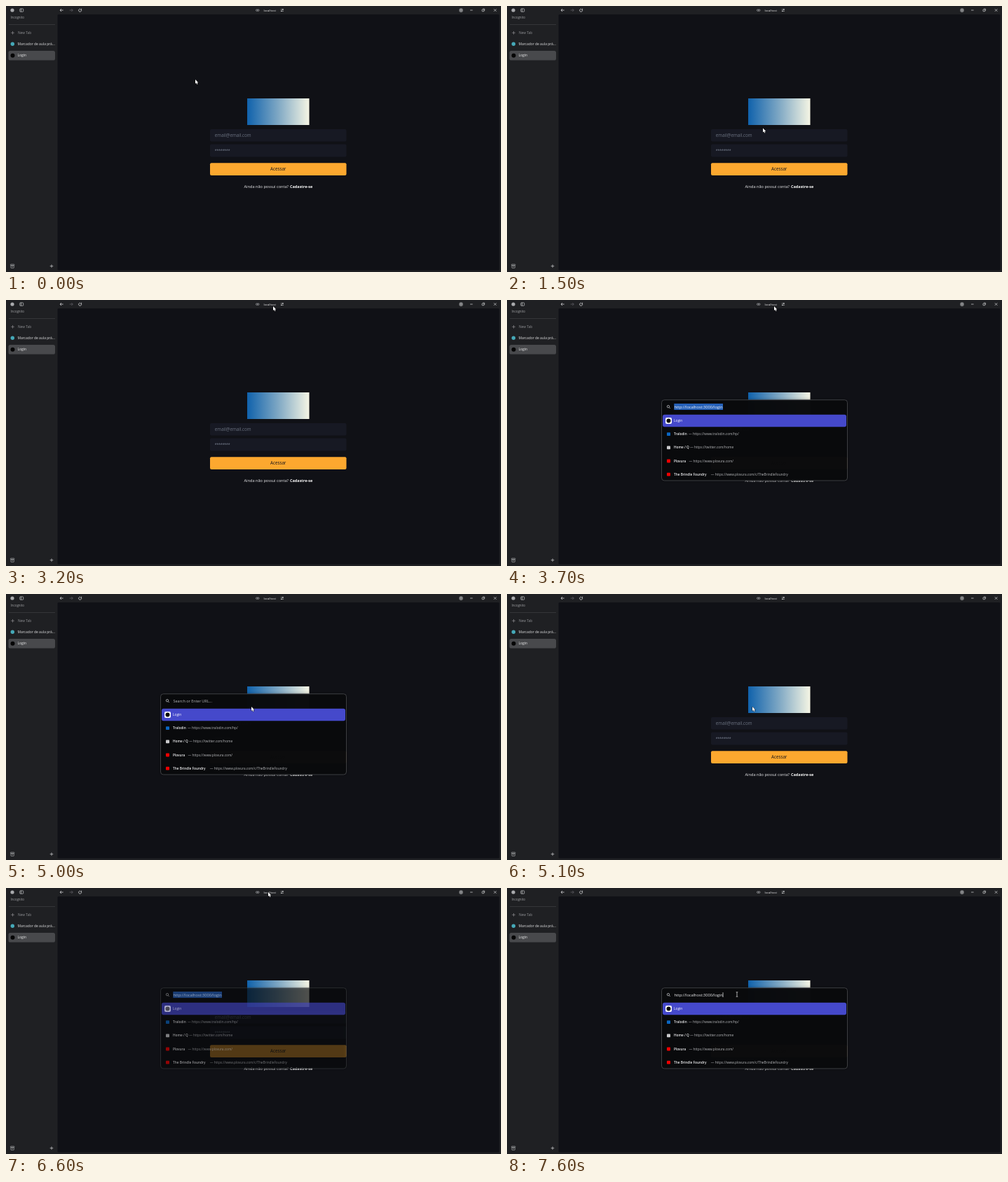
These frames come from a looping animation (706 by 380 pixels, 8000 ms). An HTML page with a canvas:

```html
<!DOCTYPE html>
<html lang="pt">
<head>
<meta charset="utf-8">
<title>Login</title>
<style>
  html, body { margin: 0; width: 100%; height: 100%; overflow: hidden; background: #1f2023; }
  canvas { display: block; width: 706px; height: 380px; }
</style>
</head>
<body>
<canvas id="stage"></canvas>
<script>
const W = 706, H = 380, LOOP = 8000, TICK = 100;
const canvas = document.getElementById('stage');
const dpr = window.devicePixelRatio || 1;
canvas.width = W * dpr;
canvas.height = H * dpr;
const ctx = canvas.getContext('2d');
const SANS = '"Open Sans", "Noto Sans", sans-serif';

// time, x, y of the pointer tip
const PATH = [
  [600, 270, 105], [900, 360, 170],
  [1200, 360, 170], [1500, 365, 174.5], [1900, 369, 185],
  [2200, 369, 185], [2300, 389.5, 115], [2600, 388, 28], [2800, 385, 12],
  [2900, 385, 12], [3200, 381, 9],
  [3900, 381, 9], [4300, 354, 115], [4600, 350, 161],
  [5200, 350, 161], [5400, 347, 90], [5700, 368, 0],
  [5900, 368, 0], [6100, 374, 6],
  [6700, 374, 6], [7000, 338, 118], [7200, 328, 152]
];

const clamp = v => Math.max(0, Math.min(1, v));
const smooth = v => { v = clamp(v); return v * v * (3 - 2 * v); };
const mix = (a, b, k) => a + (b - a) * k;
const mixRgb = (a, b, k) => `rgb(${a.map((v, i) => Math.round(mix(v, b[i], k)))})`;

function pointerAt(t) {
  if (t <= PATH[0][0]) return PATH[0].slice(1);
  for (let i = 1; i < PATH.length; i++) {
    const [t0, x0, y0] = PATH[i - 1], [t1, x1, y1] = PATH[i];
    if (t <= t1) {
      const k = (t - t0) / (t1 - t0);
      return [mix(x0, x1, k), mix(y0, y1, k)];
    }
  }
  return PATH[PATH.length - 1].slice(1);
}

function box(x, y, w, h, r, fill, stroke, width = 0.6) {
  ctx.beginPath();
  ctx.roundRect(x, y, w, h, r);
  if (fill) { ctx.fillStyle = fill; ctx.fill(); }
  if (stroke) { ctx.strokeStyle = stroke; ctx.lineWidth = width; ctx.stroke(); }
}

function dot(x, y, r, fill) {
  ctx.beginPath();
  ctx.arc(x, y, r, 0, Math.PI * 2);
  ctx.fillStyle = fill;
  ctx.fill();
}

// each line is a flat list of x, y pairs
function lines(color, width, ...list) {
  ctx.strokeStyle = color;
  ctx.lineWidth = width;
  ctx.beginPath();
  for (const p of list) {
    ctx.moveTo(p[0], p[1]);
    for (let i = 2; i < p.length; i += 2) ctx.lineTo(p[i], p[i + 1]);
  }
  ctx.stroke();
}

// y is the middle of the line
function text(str, x, y, size, color, weight = 400, align = 'left', family = SANS) {
  ctx.font = `${weight} ${size}px ${family}`;
  ctx.textAlign = align;
  ctx.fillStyle = color;
  ctx.fillText(str, x, y + size * 0.33);
}

function plus(x, y, color) {
  lines(color, 0.7, [x - 2.3, y, x + 2.3, y], [x, y - 2.3, x, y + 2.3]);
}

function arrow(x, y, dir, color) {
  lines(color, 0.8, [x - 2.3, y, x + 2.3, y],
    [x + dir * 0.3, y - 2, x + dir * 2.3, y, x + dir * 0.3, y + 2]);
}

function drawSidebar() {
  const grey = '#b9babd';
  dot(9, 6, 2.6, '#a9aaad');
  box(19.7, 3.9, 5, 4.3, 0.8, null, '#c8c9cb', 0.7);
  lines('#c8c9cb', 0.7, [21.5, 4, 21.5, 8]);
  text('Incognito', 6.5, 17, 4.5, '#a2a3a6');
  lines('#3a3b3f', 0.8, [4, 26.5, 70, 26.5]);
  plus(9.5, 38.3, '#8e8f93');
  text('New Tab', 17, 38.4, 4.8, '#919296');
  dot(9.3, 54.3, 2.7, '#45a9b8');
  text('Marcador de aula prá...', 16.5, 54.6, 4.95, '#e2e2e4', 500);
  box(3.5, 64, 66.5, 13.5, 2.6, '#48494c');
  dot(9.5, 70.8, 3, '#050505');
  text('Login', 16.5, 70.8, 4.95, '#f2f2f3', 500);
  box(6.4, 369, 5.4, 1.7, 0.4, null, grey);
  box(6.9, 370.7, 4.4, 3.6, 0.5, null, grey);
  lines(grey, 0.6, [8.2, 372.2, 10, 372.2]);
  plus(65, 371.6, '#d0d1d3');
}

function drawTopBar() {
  const light = '#d3d4d6', grey = '#a4a5a8';
  arrow(79.3, 6, -1, light);
  arrow(93, 6, 1, '#5d5e62');
  ctx.beginPath();
  ctx.arc(105.6, 6.2, 2, -0.6, 4.9);
  ctx.strokeStyle = light;
  ctx.lineWidth = 0.8;
  ctx.stroke();
  lines(light, 0.7, [107.6, 3.6, 107.6, 5.2, 106, 5.2]);
  box(356.5, 4.8, 2.5, 2.6, 1.2, null, grey, 0.7);
  box(358.5, 4.8, 2.5, 2.6, 1.2, null, grey, 0.7);
  text('localhost', 376.2, 6.2, 4.2, '#e4e4e6', 500, 'center');
  lines(light, 0.6, [391.8, 4.9, 396, 4.9], [391.8, 7.3, 396, 7.3]);
  dot(394.8, 4.9, 0.8, light);
  dot(392.9, 7.3, 0.8, light);
  box(647, 4, 4, 4.2, 0.7, null, light, 0.7);
  lines(light, 0.7, [647, 6, 651, 6], [649, 4, 649, 8]);
  lines(light, 0.7, [662, 6, 665.6, 6]);
  box(679, 4.9, 2.8, 2.8, 0.4, null, light, 0.7);
  lines(light, 0.6, [680, 4.1, 682.6, 4.1, 682.6, 6.8]);
  lines(light, 0.7, [695.8, 4.2, 699.4, 7.8], [699.4, 4.2, 695.8, 7.8]);
}

function drawPage(hover) {
  box(73.5, 12, 630, 365.5, 1.5, '#101116');
  const g = ctx.createLinearGradient(344, 0, 432.5, 0);
  g.addColorStop(0, '#1062ac');
  g.addColorStop(0.5, '#7fa8c4');
  g.addColorStop(1, '#f5f5e4');
  ctx.fillStyle = g;
  ctx.fillRect(344, 132, 88.5, 38);
  box(291, 176, 194.5, 17.5, 2, mixRgb([23, 25, 35], [209, 213, 219], hover));
  text('email@email.com', 297.8, 184.9, 6.28, '#6b7280');
  box(291, 197.5, 194.5, 18, 2, '#171923');
  text('********', 297.8, 207.2, 6.3, '#6b7280', 400, 'left', 'Roboto, sans-serif');
  box(291, 224.3, 194.5, 17.7, 2, '#fca82f');
  text('Acessar', 388.2, 233.2, 6.25, '#15151a', 500, 'center');
  text('Ainda não possui conta?', 339.5, 258.4, 5.63, '#eeeef0');
  text('Cadastre-se', 405, 258.4, 5.5, '#ffffff', 700);
}

const ROWS = [
  ['Tralodin', 259, 'https://www.tralodin.com/hp/', '#0a66c2'],
  ['Home / Q', 261, 'https://twitter.com/home', '#c9c9cb'],
  ['Plovura', 259.5, 'https://www.plovura.com/', '#f00000'],
  ['The Brindle Foundry', 290.7, 'https://www.plovura.com/c/TheBrindleFoundry', '#f00000']
];

function drawPalette(mode, alpha) {
  ctx.save();
  ctx.globalAlpha = alpha;
  ctx.shadowColor = 'rgba(0,0,0,0.45)';
  ctx.shadowBlur = 4 * dpr;
  box(220.5, 142.7, 265, 115.3, 4, 'rgba(10,11,13,0.975)');
  ctx.shadowColor = 'transparent';
  box(220.5, 142.7, 265, 115.3, 4, null, '#4b4c50', 0.8);

  ctx.beginPath();
  ctx.arc(230, 152.2, 1.7, 0, Math.PI * 2);
  ctx.strokeStyle = '#d5d6d8';
  ctx.lineWidth = 0.7;
  ctx.stroke();
  lines('#d5d6d8', 0.8, [231.3, 153.5, 232.8, 155]);

  if (mode === 'empty') {
    text('Search or Enter URL...', 238.5, 152.7, 5.5, '#b4b5b8');
  } else {
    const url = 'http://localhost:3000/login';
    if (mode === 'selected') box(238.3, 148, 69.7, 9, 0, '#2560b8');
    text(url, 238.5, 152.7, 5.63, '#f0f0f2');
    if (mode === 'caret') lines('#ffffff', 0.7, [308, 149.2, 308, 156]);
  }

  box(222, 163.7, 262, 17.5, 2.6, '#4549cb');
  box(226, 168, 9, 9, 2, '#ffffff');
  dot(230.5, 172.5, 3, '#050505');
  text('Login', 238, 172.4, 4.85, '#ffffff', 500);
  ROWS.forEach(([name, x, url, color], i) => {
    const y = 191.6 + i * 19.2;
    box(228, y - 2.4, 5, 4.8, 0.8, color);
    text(name, 238, y, 4.75, '#ececee', 600);
    text('— ' + url, x, y, 4.75, '#b6b7ba');
  });
  ctx.restore();
}

function drawArrow(x, y) {
  const shape = [0, 0, 0, 6, 1.4, 4.8, 2.4, 7, 3.4, 6.5, 2.5, 4.5, 4.3, 4.4];
  ctx.beginPath();
  for (let i = 0; i < shape.length; i += 2) ctx.lineTo(x + shape[i], y + shape[i + 1]);
  ctx.closePath();
  ctx.lineJoin = 'round';
  ctx.strokeStyle = '#08080a';
  ctx.lineWidth = 0.8;
  ctx.stroke();
  ctx.fillStyle = '#ffffff';
  ctx.fill();
}

function drawBeam(x, y, color) {
  lines(color, 0.7, [x, y - 3, x, y + 3],
    [x - 1.3, y - 3.2, x + 1.3, y - 3.2], [x - 1.3, y + 3.2, x + 1.3, y + 3.2]);
}

function paletteAt(t) {
  if (t >= 3600 && t < 5100) return [t < 5000 ? 'selected' : 'empty', t < 3700 ? 0.6 : 1];
  if (t >= 6600) return [t < 7500 ? 'selected' : t < 7600 ? 'plain' : 'caret', t < 6700 ? 0.6 : 1];
  return null;
}

function draw(t) {
  const hover = smooth((t - 1600) / 300) * (1 - smooth((t - 2300) / 300));
  const palette = paletteAt(t);
  const [x, y] = pointerAt(t);

  ctx.setTransform(dpr, 0, 0, dpr, 0, 0);
  ctx.fillStyle = '#1f2023';
  ctx.fillRect(0, 0, W, H);
  drawSidebar();
  drawTopBar();
  drawPage(hover);
  if (palette) drawPalette(...palette);

  const overField = !palette && y > 176.5 && y < 193;
  const overSearch = palette && y > 144 && y < 159;
  if (overField) drawBeam(x, y, hover > 0.5 ? '#1a1b20' : '#f0f0f0');
  else if (overSearch) drawBeam(x, y, '#e8e8ea');
  else drawArrow(x, y);
}

const start = performance.now();
function loop() {
  const t = (performance.now() - start) % LOOP;
  draw(Math.floor(t / TICK) * TICK);
  requestAnimationFrame(loop);
}
loop();
</script>
</body>
</html>
```
